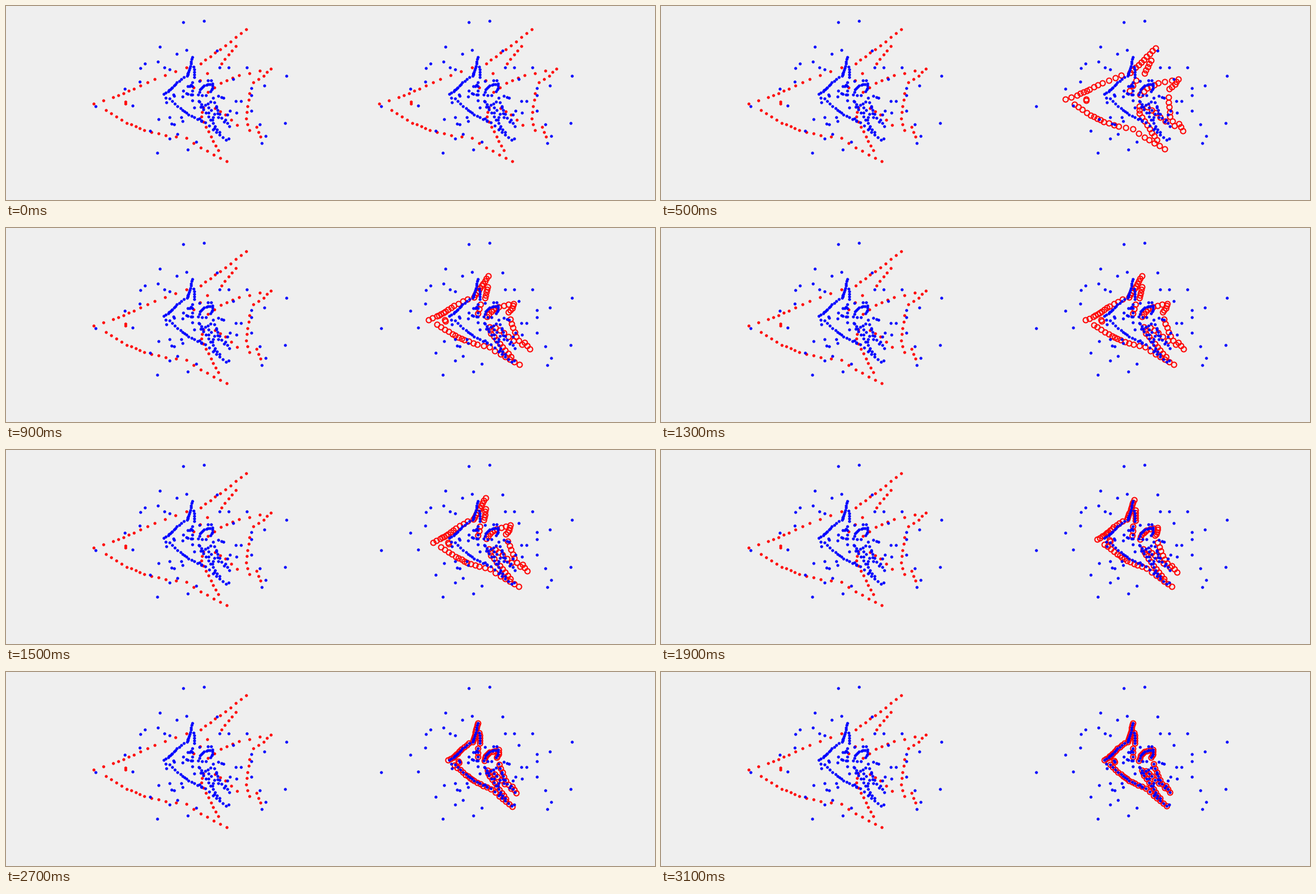
These frames come from a looping animation (1000 by 300 pixels, 3700 ms). A matplotlib script:

```python
import numpy as np
import matplotlib.pyplot as plt
from matplotlib.animation import FuncAnimation

W, H, DPI = 1000, 300, 100
PX = 72 / DPI                       # points per pixel
SHIFT = np.array([440, 0])          # offset from left to right panel
INTERVAL, FRAMES = 100, 37
START, STEP, END = 500, 200, 3100

# Fish strokes: corner x, y and the number of dots on the leg that ends there
strokes = dict(
    back=[(135, 151, 1), (165, 141, 2), (197, 128, 4), (229.5, 113, 3),
          (278, 95, 3), (300, 88.5, 1), (330, 67, 4), (370, 36, 5)],
    dorsal=[(354, 62, 1), (332, 88.5, 4), (310, 104, 1), (289.5, 126, 2)],
    eye=[(184, 148, 1), (184, 151, 1)],
    belly=[(154, 160.5, 1), (186.5, 180.5, 4), (213.5, 192, 4), (246, 200, 3),
           (278, 204, 2), (300, 219, 2), (340.5, 240, 4)],
    ventral=[(327, 223, 1), (316, 202, 3), (301, 171, 4), (304, 157, 2)],
    upper_tail=[(311, 133, 1), (331.5, 119, 2), (359, 107, 3),
                (408, 96.5, 3), (397, 108, 2), (381, 118, 2)],
    lower_tail=[(375.5, 135, 1), (370, 174, 4), (375.5, 192, 2),
                (386.5, 187, 1), (392, 202, 2)],
    stem=[(322, 157.5, 1), (338, 168, 2), (356.5, 184, 2)],
)

# The motion is affine: time, nose, fin tip, belly tip, easing power to the next
keys = [
    (500, (623, 144), (762, 65), (776, 220.5), 0.6),
    (900, (651, 142), (743, 74), (791, 211), 2),
    (1500, (658, 143), (739, 74), (790, 211), 1),
    (1900, (672, 138), (729, 77), (787, 211), 1),
    (2300, (680, 137), (727, 78.5), (784, 210), 0.7),
    (3100, (683, 136), (727.5, 79), (779, 207), 1),
]

# Isolated strays; the rest of the noise is a random cloud
strays = [(273.5, 25), (305, 22.5), (237.5, 62.5), (263.5, 74), (278, 68),
          (325, 69), (234, 86), (214, 89), (207.5, 95.5), (206, 117),
          (183.5, 128), (138, 154.5), (195, 154), (222, 193), (233.5, 227),
          (280.5, 222), (293.5, 210), (432, 107.5), (430, 181), (398.5, 123),
          (391.5, 183), (400, 201), (394, 211.5)]


def trace(corners):
    corners = np.array(corners, float)
    index = np.cumsum(corners[:, 2]) - 1
    i = np.arange(index[-1] + 1)
    return np.column_stack([np.interp(i, index, c) for c in corners.T[:2]])


def with_one(p):
    return np.column_stack([p, np.ones(len(p))])


fish = np.vstack([trace(s) for s in strokes.values()])
tips = np.array([strokes[s][i][:2]
                 for s, i in (("back", 0), ("back", -1), ("belly", -1))])
weights = with_one(fish) @ np.linalg.inv(with_one(tips))


def fish_at(t):
    """Fish dots carried along by the three tips."""
    k = max(i for i, key in enumerate(keys[:-1]) if key[0] <= t)
    (t0, *a, power), (t1, *b, _) = keys[k], keys[k + 1]
    u = min((t - t0) / (t1 - t0), 1) ** power
    return weights @ ((1 - u) * np.array(a) + u * np.array(b))


rng = np.random.default_rng(4)
cloud = rng.normal((312, 142), (40, 30), (60, 2))
cloud = np.clip(cloud, (230, 95), (378, 205))
target = np.vstack([strays, cloud, fish_at(END) - SHIFT])

fig = plt.figure(figsize=(W / DPI, H / DPI), dpi=DPI, facecolor="#efefef")
ax = fig.add_axes([0, 0, 1, 1])
ax.set(xlim=(0.5, W + 0.5), ylim=(H, 0))
ax.axis("off")


def dots(xy, color, z):
    return ax.plot(*xy.T, "o", ms=4.5 * PX, mew=0, color=color, zorder=z)[0]


dots(fish, "red", 1)
start_dots = dots(fish + SHIFT, "red", 1)
dots(target, "blue", 3)
dots(target + SHIFT, "blue", 3)
rings, = ax.plot([], [], "o", ms=8 * PX, mew=1.8 * PX,
                 mfc="none", mec="red", zorder=2)


def update(i):
    t = i * INTERVAL
    moving = t >= START
    start_dots.set_visible(not moving)
    rings.set_visible(moving)
    if moving:
        rings.set_data(*fish_at(min(t - (t - START) % STEP, END)).T)
    return start_dots, rings


anim = FuncAnimation(fig, update, frames=FRAMES, interval=INTERVAL,
                     repeat=True)
plt.show()
```
